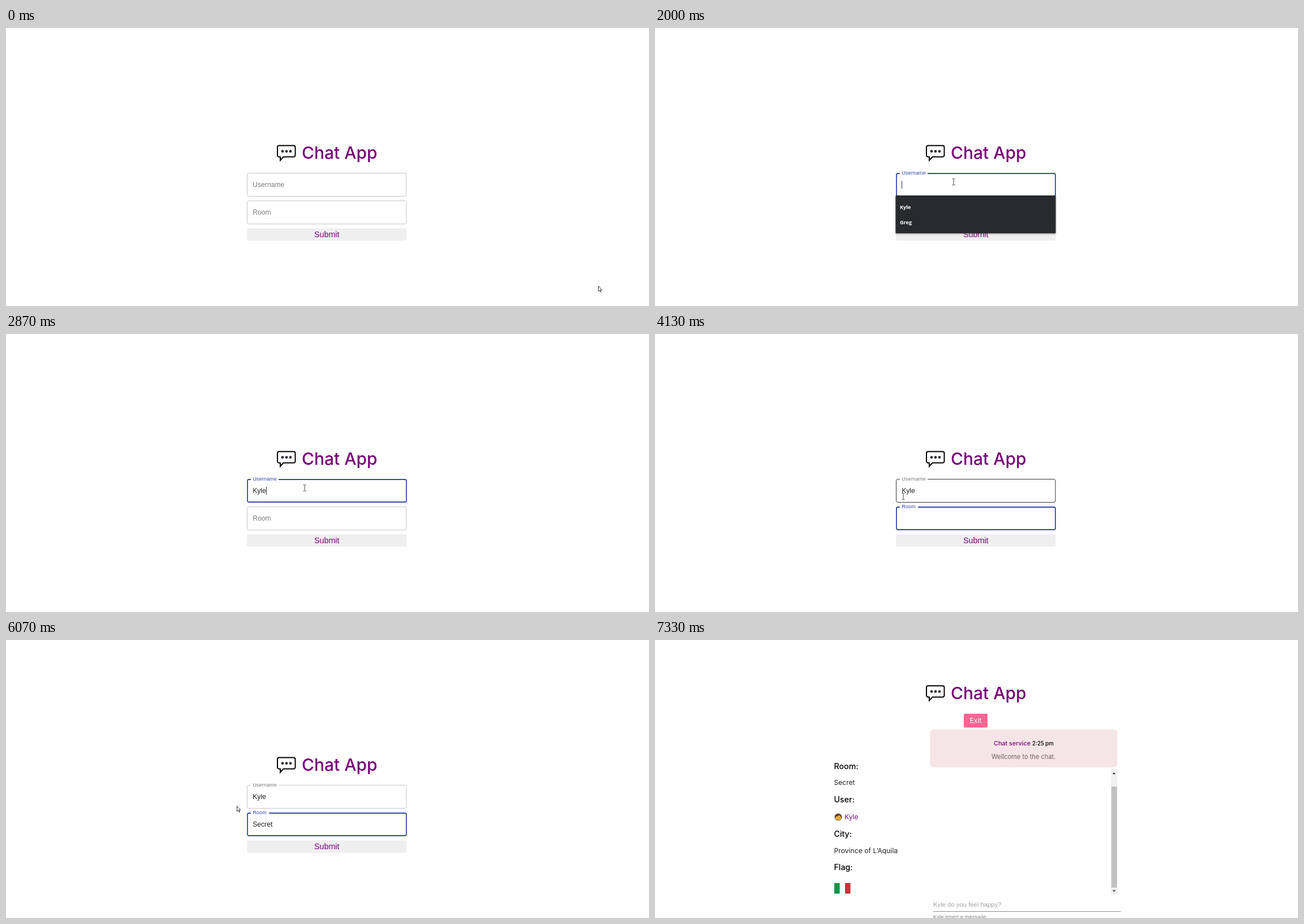
Recreate the animation shown at these times as an HTML page. Size 1137 by 493 pixels, loop 8 s.

```html
<!DOCTYPE html>
<html lang="en">
<head>
<meta charset="utf-8">
<title>Chat App</title>
<style>
  html, body { margin: 0; height: 100%; overflow: hidden; background: #fff; }
  svg { display: block; width: 100%; height: 100%; }
  text { font-family: "Liberation Sans", Arial, sans-serif; white-space: pre; }
  .geo { font-family: Inter, sans-serif; }
  .menu { font-family: "Open Sans", sans-serif; font-weight: 700; }
  .drop { filter: drop-shadow(0 1px 1.5px rgba(0, 0, 0, .45)); }
</style>
</head>
<body>
<svg id="stage" viewBox="0 0 1137 493"></svg>
<script>
const LOOP = 8000, FPS = 15;
const USER = 'Kyle', OTHER = 'Greg', ROOM = 'Secret';
const PURPLE = '#780078', BLUE = '#3549ab', GREY = '#7a7a7a';

// All moments below are ticks of 1/15 s
const FOCUS_USER = 15, FOCUS_ROOM = 48, ENTER = 96;
const USER_KEYS = [34, 36, 38, 43];
const ROOM_KEYS = [65, 70, 73, 77, 80, 83];

const stage = document.getElementById('stage');
const clamp = v => Math.max(0, Math.min(1, v));
const mix = (a, b, k) => a + (b - a) * k;
const easeOut = k => 1 - (1 - clamp(k)) ** 2;
const smooth = k => k * k * (3 - 2 * k);
const typed = (word, keys, n) => word.slice(0, keys.filter(k => k <= n).length);

const text = (x, y, size, fill, str, attrs = '') =>
  `<text x="${x}" y="${y}" font-size="${size}" fill="${fill}" ${attrs}>${str}</text>`;
const geo = (x, y, size, fill, str, attrs = '') =>
  text(x, y, size, fill, str, 'class="geo" ' + attrs);
const rect = (x, y, w, h, fill, attrs = '') =>
  `<rect x="${x}" y="${y}" width="${w}" height="${h}" fill="${fill}" ${attrs}/>`;
const path = (d, attrs) => `<path d="${d}" ${attrs}/>`;

const pen = document.createElement('canvas').getContext('2d');
function textWidth(str, size) {
  pen.font = size + 'px "Liberation Sans", Arial, sans-serif';
  return pen.measureText(str).width;
}

function title(dy) {
  const dots = [489, 496, 503].map(x => `<circle cx="${x}" cy="218.7" r="2.4" fill="#2b2b33"/>`).join('');
  return `<g transform="translate(0 ${dy})">` +
    path('M483 208.5h25.5a3 3 0 0 1 3 3v14a3 3 0 0 1-3 3h-18l-5.5 6.2v-6.2h-2a3 3 0 0 1-3-3v-14a3 3 0 0 1 3-3z',
      'fill="#fff" stroke="#000" stroke-width="2"') + dots +
    geo(523, 232, 30, PURPLE, 'Chat App', 'font-weight="500"') + '</g>';
}

// lift: 0 = label inside the box, 1 = label on its top edge
function field(y, label, notch, value, lift, focused, hover, caret) {
  const color = focused ? BLUE : hover ? '#333' : '#c4c4c4';
  let out = focused
    ? rect(427, y + 1, 281, 40, '#fff', `rx="2.5" stroke="${color}" stroke-width="1.8"`)
    : rect(426.5, y + .5, 281.5, 41, '#fff', `rx="3" stroke="${color}"`);
  if (lift) out += rect(433, y - 1, notch * lift, 4, '#fff');
  out += text(436.2, mix(y + 25, y + 3.4, lift), mix(12, 9.1, lift), focused ? BLUE : GREY, label,
    'letter-spacing=".1"');
  out += text(436.2, y + 24.7, 12.15, '#222', value);
  if (caret) out += rect(Math.round(436 + textWidth(value, 12.15)), y + 14, 1, 14, '#333');
  return out;
}

function menu(rows) {
  return `<g class="drop">${rect(425.5, 297, 283, 13 + 27 * rows.length, '#292a2d', 'rx="1"')}</g>` +
    rows.map((r, i) => text(433, 321 + 27 * i, 9.1, '#fff', r, 'class="menu"')).join('');
}

function pointer(n) {
  if (n <= 13) {
    const k = smooth(n / 13);
    return [mix(1047, 528, k), mix(457, 273, k)];
  }
  if (n < 62) return [528, 273];
  if (n < 73) return [[439, 288], [424, 291], [421, 292], [420, 292]][Math.min(n - 62, 3)];
  if (n < 74) return [412, 293];
  const k = clamp((n - 102) / 7) ** 1.5;
  return [mix(408, 153, k), mix(294, 20, k)];
}

const inside = ([x, y], top) => x > 426 && x < 708 && y > top && y < top + 42;

function cursor([x, y], beam) {
  const shape = beam
    ? path('M-2.5-5.5h1.8l.7.7.7-.7h1.8M0-4.8v9.6M-2.5 5.5h1.8l.7-.7.7.7h1.8',
        'fill="none" stroke="#444" stroke-width="1"')
    : path('M.5.5v9.4l2.1-1.9 1.5 3.4 1.4-.6-1.5-3.3h2.8z',
        'fill="#fff" stroke="#222" stroke-width=".9"');
  return `<g transform="translate(${x} ${y})">${shape}</g>`;
}

function login(n, pos) {
  const inRoom = n >= FOCUS_ROOM, inUser = n >= FOCUS_USER && !inRoom;
  const lastKey = Math.max(...[14, FOCUS_ROOM, ...USER_KEYS, ...ROOM_KEYS].filter(k => k <= n));
  const blink = Math.floor((n - lastKey) / 8) % 2 === 0;
  const user = typed(USER, USER_KEYS, n), room = typed(ROOM, ROOM_KEYS, n);
  let out = title(0) +
    field(257, 'Username', 49, user, easeOut((n - FOCUS_USER + 1) / 3), inUser, inside(pos, 257), inUser && blink) +
    field(306, 'Room', 32, room, easeOut((n - FOCUS_ROOM + 1) / 4), inRoom, inside(pos, 306), inRoom && blink) +
    rect(426, 355.3, 282.5, 22, '#efefef', 'rx="3"') +
    text(567.2, 371.3, 14.3, PURPLE, 'Submit', 'text-anchor="middle"');
  if (n > FOCUS_USER && n < USER_KEYS[3]) out += menu(user ? [USER] : [USER, OTHER]);
  return out;
}

function face() {
  return '<circle cx="324" cy="314" r="6.3" fill="#2f241f"/>' +
    '<ellipse cx="324" cy="315.2" rx="5" ry="4.8" fill="#fbc043"/>' +
    path('M318.8 313.5q.4-5.2 5.2-5.2t5.2 5.2q-2-.8-3-2.6-3 2.2-7.4 2.6z', 'fill="#70452b"') +
    '<circle cx="322" cy="314.6" r=".7"/><circle cx="326" cy="314.6" r=".7"/>' +
    path('M322 317.4q2 1.3 4 0', 'fill="none" stroke="#5a3015" stroke-width=".7"');
}

function chat(n) {
  const heads = [['Room:', 229], ['User:', 288], ['City:', 349], ['Flag:', 408]];
  let out = title(-127.3) +
    rect(546, 130.7, 42, 24.5, '#fb6593', 'rx="1.5"') +
    geo(567, 147, 12.3, '#fff', 'Exit', 'text-anchor="middle"') +
    heads.map(([s, y]) => geo(316.5, y, 14.2, '#000', s, 'font-weight="500"')).join('') +
    geo(316.5, 257, 12.1, '#222', ROOM) +
    rect(806, 229, 11.5, 223, '#f1f1f1') +
    rect(807, 260, 10, 179, '#c1c1c1') +
    path('M809 238l2.8-3.4 2.8 3.4zM809 443.5l2.8 3.4 2.8-3.4z', 'fill="#444"') +
    text(492, 473, 11.3, '#a2a2a2', USER + ' do you feel happy?') +
    rect(492, 481, 331.5, 1, '#8c8c8c') +
    text(492, 494, 9.1, GREY, USER + ' insert a message', 'letter-spacing=".22"');
  if (n >= ENTER + 2) {
    out += rect(486.5, 158.7, 331, 67, '#f6e5e6', 'rx="6"') +
      geo(599, 187, 10.8, PURPLE, 'Chat service', 'font-weight="500"') +
      geo(667, 187, 9.7, '#000', '2:25 pm', 'font-weight="500"') +
      geo(651.7, 211, 11.1, '#6b6467', 'Wellcome to the chat.', 'text-anchor="middle"');
  }
  if (n >= ENTER + 3) {
    out += face() + geo(335, 318, 12.2, '#7a1a7a', USER) +
      geo(316.5, 378, 12.2, '#222', 'Province of L’Aquila') +
      rect(317, 431, 9.6, 18.7, '#119447') +
      rect(336, 431, 9.6, 18.7, '#c9303a');
  }
  return out;
}

function draw(n) {
  const pos = pointer(n), onLogin = n < ENTER;
  const beam = onLogin && (inside(pos, 257) || inside(pos, 306));
  stage.innerHTML = (onLogin ? login(n, pos) : chat(n)) + (n < 110 ? cursor(pos, beam) : '');
}

let shown = -1;
function frame(now) {
  const n = Math.floor(((now + 5) % LOOP) * FPS / 1000);
  if (n !== shown) draw(shown = n);
  requestAnimationFrame(frame);
}
draw(0);
requestAnimationFrame(frame);
</script>
</body>
</html>
```
